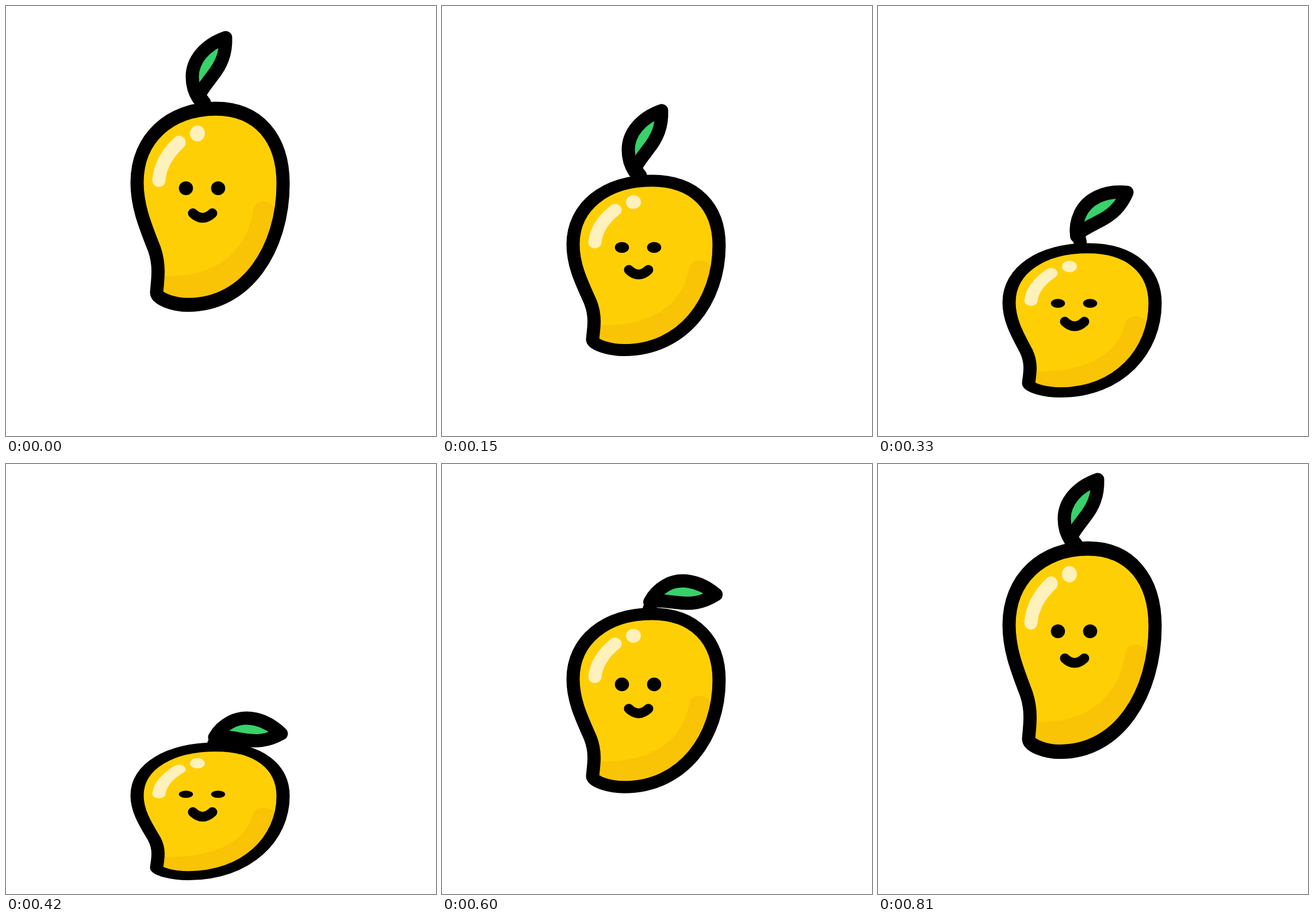
An HTML page with a canvas that plays this animation: 748x748 px, repeating every 840 ms.

```html
<!DOCTYPE html>
<html lang="en">
<head>
<meta charset="utf-8">
<title>Bouncing mango</title>
<style>
html, body { margin: 0; width: 100%; height: 100%; overflow: hidden; background: #fff; }
canvas { display: block; }
</style>
</head>
<body>
<canvas id="stage" width="748" height="748"></canvas>
<script>
const ctx = document.getElementById('stage').getContext('2d');
const STEP = 30, STEPS = 28, LANDING = 14;
const BODY_TOP = 194, BODY_HEIGHT = 348;

// Poses: step, body top, body bottom, eye y, mouth y, eye half height, leaf pivot y, leaf angle
const fall = [
  [-1, 134, 513, 291, 338, 12, 154, 0],
  [0, 166, 532, 317, 360.5, 12, 182, 0],
  [5, 293, 609, 420, 459, 9.6, 309, 0],
  [9, 372, 657, 484.5, 519.5, 8.2, 388, 0],
  [14, 484, 724, 574.5, 605.5, 6.3, 500, 63]
];
const rise = [
  fall[4],
  [18, 304, 606, 428, 467.5, 11, 320, 68],
  [23, 194, 542, 338, 383, 12, 210, 38],
  [27, 134, 513, 291, 338, 12, 154, 0]
];

const body = new Path2D(`M228 328C228 255 285 206 365 206C440 206 482 256 482 330
  C482 437 419 530.5 317 530.5C290 530.5 262 520 262 510C262 507 264.5 490 264.5 475
  C264.5 460 262 449 258 438C240 395 228 365 228 328Z`);
const shade = new Path2D(`M262 482C355 489 418 450 430 373Q434 359 449 359
  Q461 360 467 369L495 369V545H262Z`);
const shine = new Path2D('M301 262Q269 290 266 324');
const mouth = new Path2D('M325 0Q342 16 359 0');
// Leaf coordinates are relative to its pivot
const leaf = new Path2D(`M30 -127C-7 -114 -28 -87 -28 -59C-28 -44 -25 -33 -17 -21
  C-16 -32 -4 -45 6 -59C23 -80 31 -100 30 -127Z`);
const stem = new Path2D('M-17 -27L-7 -14');

// Smooth curve through all poses of one leg
function poseOn(poses, step) {
  const weights = poses.map(a => poses.reduce(
    (w, b) => a === b ? w : w * (step - b[0]) / (a[0] - b[0]), 1));
  return poses[0].map((_, col) => poses.reduce((sum, p, i) => sum + p[col] * weights[i], 0));
}

function stroke(path, width, color = '#000') {
  ctx.lineWidth = width;
  ctx.strokeStyle = color;
  ctx.stroke(path);
}

function fill(path, color) {
  ctx.fillStyle = color;
  ctx.fill(path);
}

function oval(x, y, rx, ry, color) {
  const path = new Path2D();
  path.ellipse(x, y, rx, ry, 0, 0, 2 * Math.PI);
  fill(path, color);
}

function drawLeaf(y, degrees) {
  ctx.save();
  ctx.translate(352, y);
  ctx.rotate(degrees * Math.PI / 180);
  fill(leaf, '#38d16a');
  stroke(leaf, 23);
  stroke(stem, 23);
  ctx.restore();
}

function drawBody(top, bottom) {
  ctx.save();
  ctx.translate(0, top);
  ctx.scale(1, (bottom - top) / BODY_HEIGHT);
  ctx.translate(0, -BODY_TOP);
  fill(body, '#ffcf06');
  ctx.save();
  ctx.clip(body);
  fill(shade, '#f9c405');
  ctx.restore();
  stroke(body, 23);
  stroke(shine, 23, '#fff1bc');
  oval(333, 247, 13, 13, '#fff1bc');
  ctx.restore();
}

function drawFace(eyeY, mouthY, eyeHeight) {
  for (const x of [313, 369]) oval(x, eyeY, 12.3, Math.min(12.3, eyeHeight), '#000');
  ctx.save();
  ctx.translate(0, mouthY);
  stroke(mouth, 17);
  ctx.restore();
}

function draw() {
  const step = Math.floor(performance.now() / STEP) % STEPS;
  const falling = step <= LANDING;
  const [, top, bottom, eyeY, mouthY, eyeHeight, leafY, angle] = poseOn(falling ? fall : rise, step);
  // The leaf stays upright until shortly before landing
  const leafAngle = falling ? 63 * Math.max(0, (step - 9) / 5) : angle;

  ctx.clearRect(0, 0, 748, 748);
  ctx.lineCap = ctx.lineJoin = 'round';
  drawLeaf(leafY, leafAngle);
  drawBody(top, bottom);
  drawFace(eyeY, mouthY, eyeHeight);
  requestAnimationFrame(draw);
}
draw();
</script>
</body>
</html>
```
